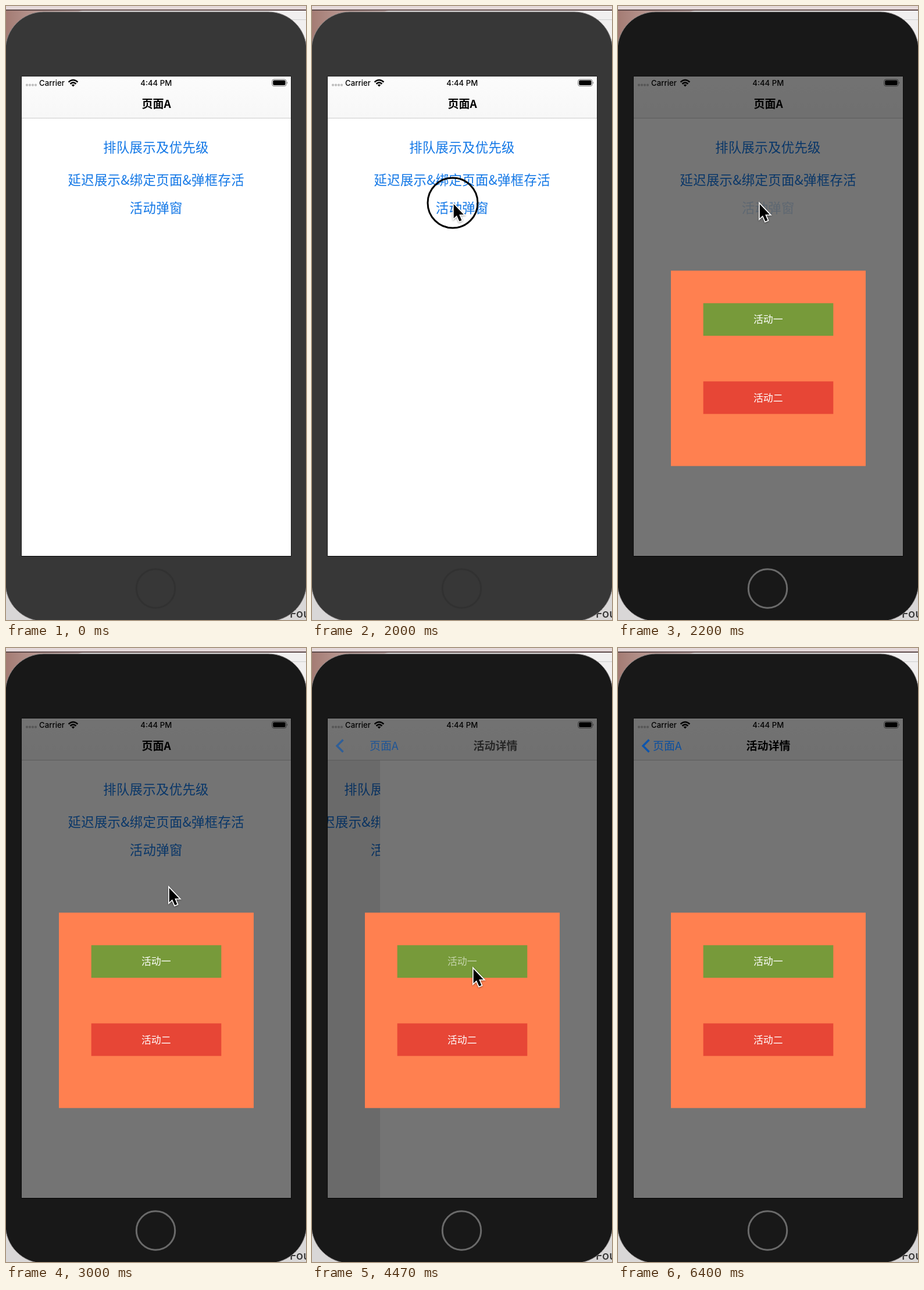
Animation of 516x1054 px, one loop 6470 ms. Source, as an HTML page:

```html
<!DOCTYPE html>
<html lang="zh-CN">
<head>
<meta charset="utf-8">
<style>
html, body { margin: 0; width: 100%; height: 100%; overflow: hidden; background: #d9d7d7; }
svg { display: block; width: 516px; height: 1054px; }
text { font-family: "Noto Sans CJK SC", "Noto Sans CJK", "Noto Sans", sans-serif; }
.mid { text-anchor: middle; }
.status { font: 500 13.2px Inter, Roboto, sans-serif; }
.title { font-size: 19px; font-weight: 600; }
.link { font-size: 22.4px; letter-spacing: .3px; fill: #1277e6; }
.back { font-size: 19px; fill: #0c4f9f; }
.btn { font-size: 16.9px; fill: #fff; }
#cursor path { fill: #000; stroke: #fff; stroke-width: 3.4; paint-order: stroke; }
#cursor { filter: drop-shadow(0 1px 1.5px rgba(0,0,0,.4)); }
</style>
</head>
<body>
<svg viewBox="0 0 516 1054">
  <defs>
    <clipPath id="screen"><rect x="27" y="121" width="463" height="823"/></clipPath>
    <linearGradient id="wall">
      <stop offset="0" stop-color="#a47c74"/><stop offset="1" stop-color="#d9c4c1"/>
    </linearGradient>
    <linearGradient id="bar" x2="0" y2="1">
      <stop offset="0" stop-color="#fcfcfc"/><stop offset="1" stop-color="#f7f7f7"/>
    </linearGradient>
  </defs>

  <!-- desktop behind the phone -->
  <rect width="516" height="1054" fill="#d9d7d7"/>
  <rect y="8" width="140" height="70" fill="url(#wall)"/>
  <path d="M122 14Q124 8 132 8H516V80H122Z" fill="#f1efef"/>
  <path d="M440 23.5H516" stroke="#cfcfcf"/>
  <rect width="516" height="6" fill="#e5d9da"/>
  <rect y="6" width="516" height="2" fill="#5e4a4a"/>
  <text x="488" y="1050" style="font:500 20px Inter, sans-serif" fill="#333">Fou</text>

  <!-- phone -->
  <rect id="body" x="-1" y="10" width="518" height="1046" rx="66" stroke="#8a8686" stroke-width="1"/>
  <circle id="home" cx="257.5" cy="1000" r="33.2" fill="none" stroke-width="3"/>
  <rect x="26.5" y="120.5" width="464" height="824.5" fill="#000"/>

  <g clip-path="url(#screen)">
    <rect x="27" y="121" width="463" height="823" fill="#fff"/>
    <g id="pageA">
      <g class="mid">
        <text class="link" x="258" y="251.3">排队展示及优先级</text>
        <text class="link" x="258.2" y="307.3">延迟展示&amp;绑定页面&amp;弹框存活</text>
        <text class="link" id="open" x="258.2" y="355.3">活动弹窗</text>
      </g>
    </g>
    <rect id="veil" x="27" y="192" width="463" height="752" fill="#000"/>
    <rect id="pageB" x="27" y="192" width="463" height="752" fill="#fff"/>
    <rect x="27" y="121" width="463" height="71" fill="url(#bar)"/>
    <path d="M27 192.5H490" stroke="#cbcbcb"/>

    <g fill="#bdbdbd">
      <circle cx="36" cy="135.7" r="2.1"/><circle cx="41" cy="135.7" r="2.1"/>
      <circle cx="46" cy="135.7" r="2.1"/><circle cx="51" cy="135.7" r="2.1"/>
    </g>
    <text class="status" x="57" y="136.7">Carrier</text>
    <text class="status mid" x="258.3" y="136.7">4:44 PM</text>
    <g fill="none" stroke="#000" stroke-width="2.6">
      <path d="M107.6 130.6Q115.5 123.4 123.4 130.6"/>
      <path d="M110.5 133.7Q115.5 129.2 120.5 133.7"/>
    </g>
    <path d="M112.7 135.4Q115.5 133.4 118.3 135.4L115.5 138.4Z"/>
    <rect x="457.6" y="126" width="24.6" height="11.6" rx="3.4" fill="none" stroke="#777"/>
    <rect x="459.2" y="127.6" width="21.4" height="8.4" rx="2"/>
    <path d="M483.3 129.8Q485.2 131.8 483.3 133.8Z" fill="#666"/>

    <text class="title mid" id="titleA" x="258.5" y="175">页面A</text>
    <text class="title mid" id="titleB" x="258.5" y="175">活动详情</text>
    <rect id="dim" x="27" y="121" width="463" height="823" fill="#000"/>
    <path id="chevron" d="M53.5 157.5L43 168L53.5 178.5" fill="none" stroke="#0c55ad" stroke-width="3.4"/>
    <text class="back" id="back" x="60" y="175">页面A</text>

    <g id="popup">
      <rect x="91" y="454.3" width="335" height="335.4" fill="#ff8050"/>
      <rect x="146.7" y="510.2" width="223.6" height="55.9" fill="#779a3a"/>
      <rect x="146.7" y="644.4" width="223.6" height="55.9" fill="#e74636"/>
      <text class="btn mid" id="first" x="258.3" y="544.4">活动一</text>
      <text class="btn mid" x="258.3" y="678.7">活动二</text>
    </g>
  </g>

  <circle id="ring" r="43" fill="none" stroke="#000" stroke-width="3"/>
  <g id="cursor"><path d="M1.7 4V28.4L7 23.4L11.4 33.6L15.4 31.9L11.2 21.9H18.8Z"/></g>
</svg>
<script>
const LOOP = 6470;
const $ = id => document.getElementById(id);
const set = (id, attrs) => { for (const k in attrs) $(id).setAttribute(k, attrs[k]); };
const ramp = (t, a, b) => Math.min(1, Math.max(0, (t - a) / (b - a)));
const ease = u => u * u * (3 - 2 * u);
const within = (t, a, b) => t >= a && t < b ? 1 : 0;

// time, x, y of the cursor tip
const route = [
  [70, 442, 924], [530, 256, 494], [650, 256, 494], [1000, 223, 344],
  [1250, 228, 342], [1530, 242, 336], [2300, 242, 336], [2950, 279, 408],
  [3050, 279, 408], [3900, 276, 547]
];

function tip(t) {
  let i = 0;
  while (i < route.length - 2 && t > route[i + 1][0]) i++;
  const a = route[i], b = route[i + 1], u = ease(ramp(t, a[0], b[0]));
  return [a[1] + (b[1] - a[1]) * u, a[2] + (b[2] - a[2]) * u];
}

// navigation slide: fast start, long settle
function slide(u) {
  const bez = (s, p, q) => 3 * (1 - s) ** 2 * s * p + 3 * (1 - s) * s * s * q + s ** 3;
  let lo = 0, hi = 1;
  for (let i = 0; i < 24; i++) {
    const m = (lo + hi) / 2;
    if (bez(m, .38, .125) < u) lo = m; else hi = m;
  }
  return bez(lo, .7, 1);
}

// label opacity: pressed at a, released at b
const press = (t, a, b) => t < a ? 1 : .2 + .8 * ease(ramp(t, b, b + 450));

function draw(t) {
  const active = t >= 2070;
  set("body", { fill: active ? "#181818" : "#373737" });
  set("home", { stroke: active ? "#6a6a6a" : "#313131" });

  const shown = ramp(t, 2110, 2180);
  set("dim", { opacity: .545 * shown });
  set("popup", { opacity: shown });
  set("open", { opacity: press(t, 2070, 2240) });
  set("first", { opacity: press(t, 4130, 4255) });

  const p = slide(ramp(t, 4300, 4800)), rest = 1 - p;
  const move = x => `translate(${x} 0)`;
  set("pageA", { transform: move(-139 * p) });
  set("veil", { opacity: .1 * p });
  set("pageB", { transform: move(463 * rest) });
  set("titleA", { transform: move(-200 * p), opacity: Math.max(0, 1 - 1.6 * p) });
  set("titleB", { transform: move(293 * rest), opacity: p * p });
  set("back", { transform: move(200 * rest), opacity: p });
  set("chevron", { opacity: p * p });

  const [x, y] = tip(t);
  set("cursor", {
    transform: `translate(${x} ${y})`,
    opacity: t < 60 ? 0 : 1 - ramp(t, 5200, 5500)
  });
  set("ring", {
    cx: x, cy: y + 2,
    opacity: within(t, 1940, 2120) || within(t, 4070, 4250)
  });
}

const start = performance.now();
function tick() {
  draw((performance.now() - start) % LOOP);
  requestAnimationFrame(tick);
}
draw(0);
requestAnimationFrame(tick);
</script>
</body>
</html>
```
